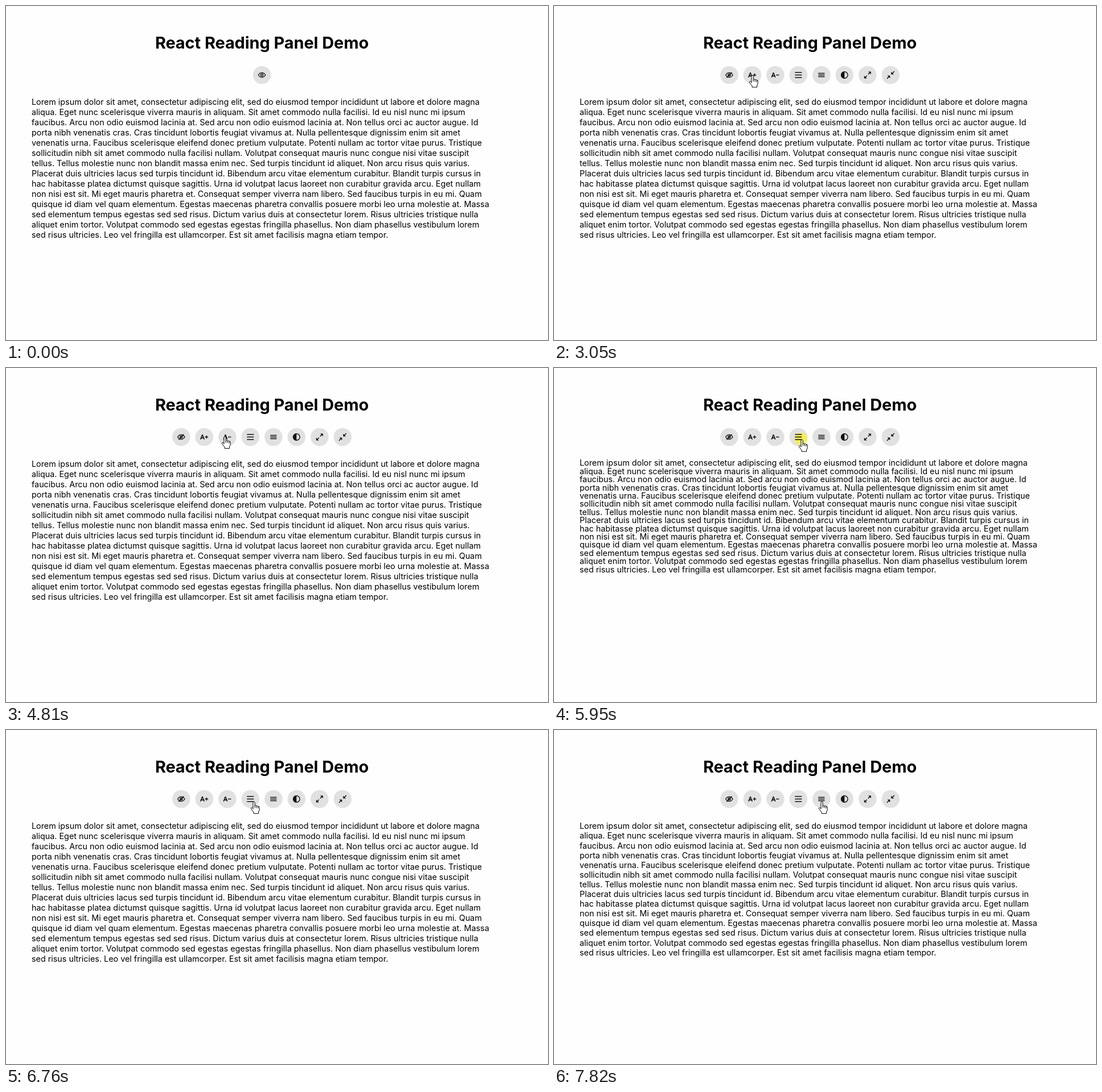
These frames come from a looping animation (952 px wide and 588 px high, 8 s). An HTML page:

```html
<!DOCTYPE html>
<html lang="en">
<head>
<meta charset="utf-8">
<title>React Reading Panel Demo</title>
<style>
  html, body { margin: 0; width: 100%; height: 100%; overflow: hidden; background: #fefefe; }
  body { position: relative; color: #000; font-family: Inter, sans-serif; font-optical-sizing: none; }
  h1, p { position: absolute; left: 45px; margin: 0; }
  h1 { top: 46.5px; width: 809px; font-size: 28.8px; line-height: 36px; font-weight: 700; text-align: center; }
  p { top: 160.4px; width: 806px; }
  svg { position: absolute; left: 0; top: 0; }
</style>
</head>
<body>
<h1>React Reading Panel Demo</h1>
<p id="text">
Lorem ipsum dolor sit amet, consectetur adipiscing elit, sed do eiusmod tempor incididunt ut labore et dolore magna
aliqua. Eget nunc scelerisque viverra mauris in aliquam. Sit amet commodo nulla facilisi. Id eu nisl nunc mi ipsum
faucibus. Arcu non odio euismod lacinia at. Sed arcu non odio euismod lacinia at. Non tellus orci ac auctor augue. Id
porta nibh venenatis cras. Cras tincidunt lobortis feugiat vivamus at. Nulla pellentesque dignissim enim sit amet
venenatis urna. Faucibus scelerisque eleifend donec pretium vulputate. Potenti nullam ac tortor vitae purus. Tristique
sollicitudin nibh sit amet commodo nulla facilisi nullam. Volutpat consequat mauris nunc congue nisi vitae suscipit
tellus. Tellus molestie nunc non blandit massa enim nec. Sed turpis tincidunt id aliquet. Non arcu risus quis varius.
Placerat duis ultricies lacus sed turpis tincidunt id. Bibendum arcu vitae elementum curabitur. Blandit turpis cursus in
hac habitasse platea dictumst quisque sagittis. Urna id volutpat lacus laoreet non curabitur gravida arcu. Eget nullam
non nisi est sit. Mi eget mauris pharetra et. Consequat semper viverra nam libero. Sed faucibus turpis in eu mi. Quam
quisque id diam vel quam elementum. Egestas maecenas pharetra convallis posuere morbi leo urna molestie at. Massa
sed elementum tempus egestas sed sed risus. Dictum varius duis at consectetur lorem. Risus ultricies tristique nulla
aliquet enim tortor. Volutpat commodo sed egestas egestas fringilla phasellus. Non diam phasellus vestibulum lorem
sed risus ultricies. Leo vel fringilla est ullamcorper. Est sit amet facilisis magna etiam tempor.
</p>
<svg width="952" height="588" fill="none" stroke="#111" stroke-width="1.4">
  <g id="discs" fill="#e1e1e1" stroke="none"></g>
  <circle id="glow" r="11" fill="rgba(255,247,0,.6)" stroke="none"/>
  <g id="icons"></g>
  <g id="cursor" fill="#fff" stroke="#000" stroke-linejoin="round" stroke-width="1">
    <path id="arrow" d="M.5 .5V16.2L4 12.8L6.4 18.3L8.7 17.3L6.3 11.8H11Z"/>
    <path id="hand" transform="translate(1.5 1)" d="M-1.6 13V1.6Q-1.6 .2 0 .2T1.6 1.6V7.5Q3.4 6 4.6 7.8Q6.5 6.6 7.4 8.5Q9.6 7.6 9.6 10.5V14Q9.6 16 8 18V21H-.5V18.8L-5 12.8Q-5.6 10.8 -4 10.5Q-2.8 10.5 -1.6 13ZM1.6 7.5V11M4.6 8V11.5M7.4 9V12"/>
  </g>
</svg>
<script>
const LOOP = 8000, HOLD = 70, MID = 449.5, ROW = 121.5, GAP = 40.5;
const FONT_UNIT = 0.897, LINE_UNIT = 0.9;
const $ = id => document.getElementById(id);

const EYE = '<path d="M-6.2 0Q-3.6 -4.1 0 -4.1T6.2 0Q3.6 4.1 0 4.1T-6.2 0Z"/><circle r="2"/>';
const LETTER = '<path stroke-width="1.6" d="M-6.6 4.2L-3.5 -3.8H-3.2L-.1 4.2M-5.6 1.6H-1.1"/>';
const bars = (half, step) =>
  `<path d="${[-step, 0, step].map(y => `M${-half} ${y}H${half}`).join('')}"/>`;
const pair = shape => shape + `<g transform="rotate(180)">${shape}</g>`;

const panelIcons = [
  EYE + '<path d="M-4.6 4.8L4.6 -4.8"/>',
  LETTER + '<path d="M1.2 0H6.8M4 -2.8V2.8"/>',
  LETTER + '<path d="M1.2 0H6.6"/>',
  bars(6, 4.5),
  bars(5.6, 3),
  '<circle r="5.8"/><path fill="#111" stroke="none" d="M0 -6A6 6 0 0 0 0 6Z"/>',
  pair('<path d="M1 -1L4.5 -4.5"/><path fill="#111" stroke="none" d="M6 -6V-1.2L1.2 -6Z"/>'),
  pair('<path d="M2.5 -2.5L6.5 -6.5"/><path fill="#111" stroke="none" d="M1 -1V-5.8L5.8 -1Z"/>')
];

// Press times for each button
const presses = {
  open: [1070],
  grow: [3080, 3420],
  shrink: [4340, 4740],
  loosen: [5390, 5950, 6290, 6470, 6690, 6890],
  tighten: [7480, 7750]
};
const allPresses = Object.values(presses).flat();

// Pointer moves: start, end, destination
const moves = [
  [260, 1010, 446, 119],
  [1200, 1550, 474, 171],
  [1740, 2090, 423, 142],
  [2090, 2300, 312, 121],
  [2500, 2860, 347, 121],
  [3600, 4010, 383, 119.5],
  [4880, 5090, 434, 125],
  [7090, 7350, 469, 125]
];

function pointerAt(t) {
  let x = 895, y = 556;
  for (const [from, to, endX, endY] of moves) {
    const f = Math.min(1, Math.max(0, (t - from) / (to - from)));
    x += (endX - x) * f;
    y += (endY - y) * f;
  }
  return [x, y];
}

let centres = [], shownOpen;

function showPanel(open) {
  if (open === shownOpen) return;
  shownOpen = open;
  const icons = open ? panelIcons : [EYE];
  centres = icons.map((_, i) => MID + (i - (icons.length - 1) / 2) * GAP);
  $('discs').innerHTML = centres.map(x => `<circle cx="${x}" cy="${ROW}" r="15.75"/>`).join('');
  $('icons').innerHTML = icons.map((icon, i) => `<g transform="translate(${centres[i]} ${ROW})">${icon}</g>`).join('');
}

const show = (id, on) => $(id).setAttribute('visibility', on ? 'visible' : 'hidden');

function draw(t) {
  const count = name => presses[name].filter(p => t >= p + HOLD).length;
  const size = 16 + count('grow') - count('shrink');
  // The first loosening sets the leading to the font size, later ones add to it
  const loosened = count('loosen');
  const leading = loosened ? size - 1 + loosened - count('tighten') : Math.max(20, size + 3);

  showPanel(count('open') > 0);
  $('text').style.fontSize = size * FONT_UNIT + 'px';
  $('text').style.lineHeight = leading * LINE_UNIT + 'px';

  const [x, y] = pointerAt(t), place = `translate(${x} ${y})`;
  const over = centres.some(c => Math.hypot(x - c, y - ROW) < 16);
  $('cursor').setAttribute('transform', place);
  $('glow').setAttribute('transform', place);
  show('arrow', t >= moves[0][0] && !over);
  show('hand', over);
  show('glow', allPresses.some(p => t >= p && t < p + HOLD));
}

const start = performance.now();
function tick() {
  draw((performance.now() - start) % LOOP);
  requestAnimationFrame(tick);
}
tick();
</script>
</body>
</html>
```
